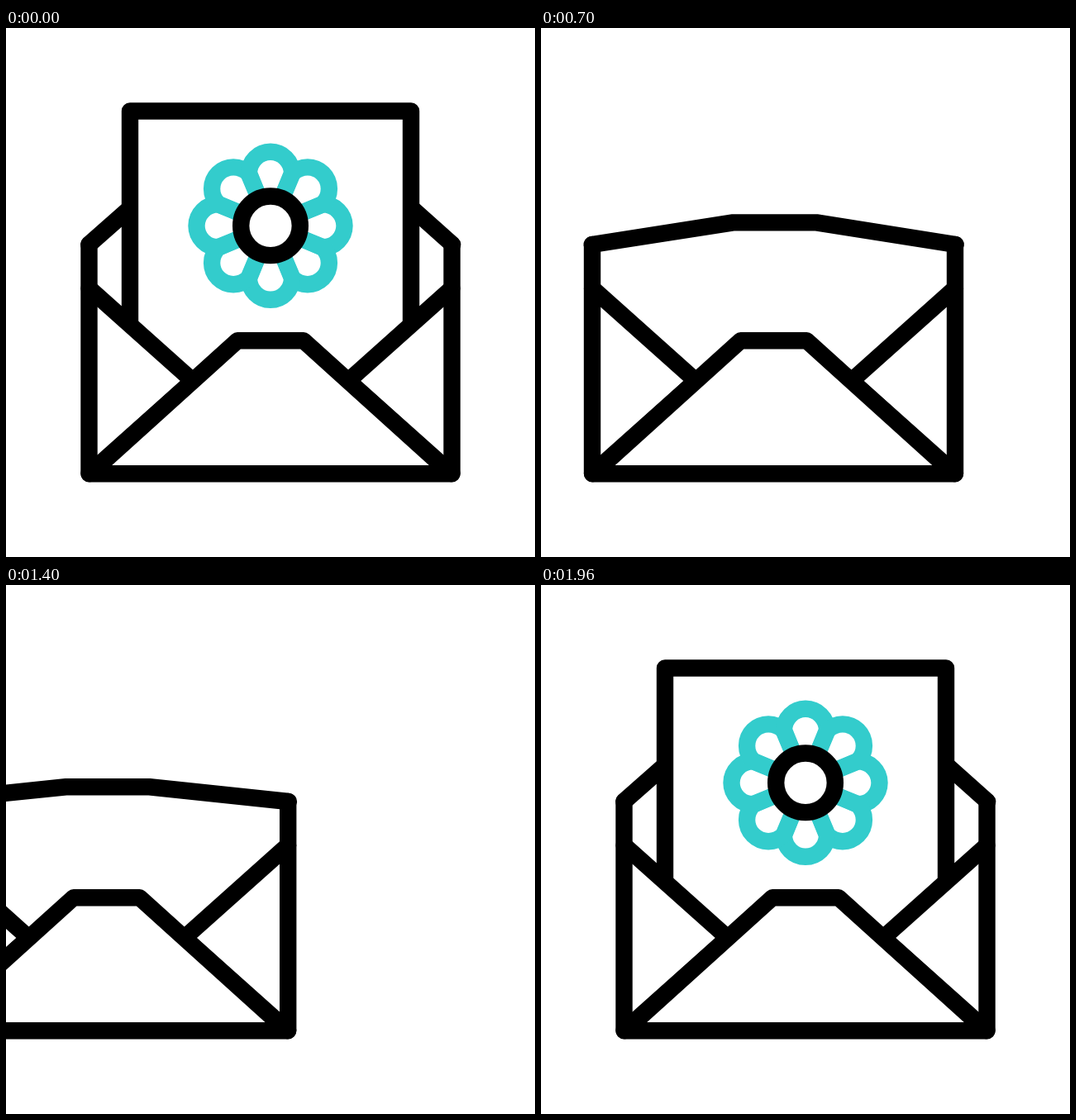
Animation of 640 by 640 pixels, one loop 2400 ms. Source, as an HTML page with a canvas:

```html
<!DOCTYPE html>
<html>
<head>
<meta charset="utf-8">
<title>Envelope</title>
<style>
html, body { margin: 0; height: 100%; overflow: hidden; background: #fff; }
canvas { display: block; width: 640px; height: 640px; }
</style>
</head>
<body>
<canvas id="stage" width="640" height="640"></canvas>
<script>
const ctx = document.getElementById('stage').getContext('2d');
const LOOP = 2400, STEP = 20, TEAL = '#33cccc';

const ease = (t, from, to) => {
  const u = Math.min(1, Math.max(0, (t - from) / (to - from)));
  return u * u * (3 - 2 * u);
};
const mix = (a, b, k) => a + (b - a) * k;

function trace(points) {
  ctx.beginPath();
  points.forEach(([x, y]) => ctx.lineTo(x, y));
}
function line(points, color = '#000') {
  trace(points);
  ctx.strokeStyle = color;
  ctx.stroke();
}
function fill(points) {
  trace(points);
  ctx.fillStyle = '#fff';
  ctx.fill();
}
function shape(points) {
  fill(points);
  line(points);
}

function flower(y) {
  ctx.save();
  ctx.beginPath();
  ctx.rect(140, -20, 360, 550);
  ctx.clip();
  ctx.translate(320, y);
  ctx.strokeStyle = TEAL;
  for (let i = 0; i < 8; i++) {
    ctx.beginPath();
    ctx.moveTo(33, -13.7);
    ctx.arc(63.5, 0, 26, -Math.PI / 2, Math.PI / 2);
    ctx.lineTo(33, 13.7);
    ctx.stroke();
    ctx.rotate(Math.PI / 4);
  }
  ctx.beginPath();
  ctx.arc(0, 0, 35.8, 0, 2 * Math.PI);
  ctx.fillStyle = '#fff';
  ctx.fill();
  ctx.strokeStyle = '#000';
  ctx.stroke();
  ctx.restore();
}

function envelope(cardShift, back, front) {
  const tip = mix(111.5, 261, back);
  const top = [[100.2, 262], [270.8, tip], [371.8, tip], [540.2, 262]];
  shape(top);

  const cardTop = 100.5 + cardShift;
  shape([[150, 530], [150, cardTop], [490, cardTop], [490, 530]]);
  flower(239.3 + cardShift);

  shape([[100.5, 314.8], [226, 427], [100.5, 539]]);
  shape([[539.5, 314.8], [414, 427], [539.5, 539]]);
  shape([[102, 539], [280, 378.3], [360, 378.3], [538, 539]]);

  if (front > 0) {
    const side = mix(262, 313.5, front), low = mix(262, 427, front);
    const flap = [[100.5, side], [mix(270.8, 226, front), low],
                  [mix(371.8, 414, front), low], [540.2, side]];
    fill([[100.5, 262], ...flap, [540.2, 262]]);
    line(flap);
    line(top);
  }
  line([[100.5, 262], [100.5, 539.3], [539.5, 539.3], [539.5, 262]]);
}

function draw(t) {
  ctx.fillStyle = '#fff';
  ctx.fillRect(0, 0, 640, 640);
  ctx.lineWidth = 20.4;
  ctx.lineCap = ctx.lineJoin = 'round';

  // speed lines sweep across between exit and return
  if (t > 1040 && t < 1400) {
    const x = mix(-400, 400, (t - 1040) / 360);
    [[290.2, 288.4], [305.4, 372.3], [290.2, 453]].forEach(([left, y]) =>
      line([[left + x, y], [left + x + 42, y]], TEAL));
  }

  const card = -63 * ease(t, 0, 300) + 403 * ease(t, 300, 550)
             - 403 * ease(t, 1465, 1680) + 63 * ease(t, 1680, 1960);
  const back = ease(t, 560, 750) - ease(t, 1350, 1590);
  const front = ease(t, 750, 940) - ease(t, 1140, 1350);
  const x = t < 1130
    ? -77 * ease(t, 560, 840) + 632 * Math.max(0, (t - 840) / 280) ** 2
    : -630 * (1 - ease(t, 998, 1640));

  ctx.save();
  ctx.translate(x, 0);
  envelope(card, back, front);
  ctx.restore();
}

const start = performance.now();
function tick() {
  const t = (performance.now() - start) % LOOP;
  draw(Math.floor(t / STEP) * STEP);
  requestAnimationFrame(tick);
}
tick();
</script>
</body>
</html>
```
